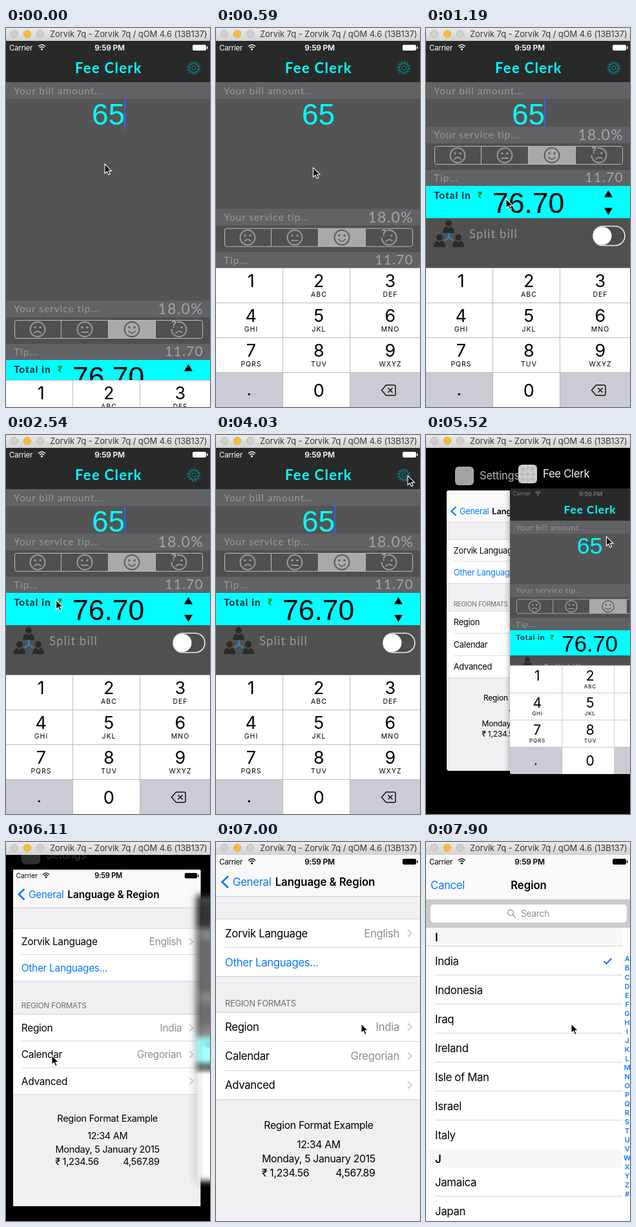
Animation, 316 px wide and 588 px high, one loop 8000 ms. Source, as an HTML page:

```html
<!DOCTYPE html>
<html lang="en">
<head>
<meta charset="utf-8">
<title>Tip calculator demo</title>
<style>
html, body { margin: 0; width: 100%; height: 100%; overflow: hidden; background: #000; }
svg { display: block; width: 316px; height: 588px; }
text { white-space: pre; }
</style>
</head>
<body>
<svg id="stage" viewBox="0 0 316 588"></svg>
<script>
const LOOP = 8000, STEP = 149.05;
const BLUE = '#0a7aff', GREY = '#8e8e93', APP = 'Fee Clerk', PHONE = 'Zorvik';

const FONTS = {
  ui: ['Inter, sans-serif', -0.02],
  hand: ['Lato, sans-serif', 0.06],
  num: ['Liberation Sans, Arial, sans-serif', 0]
};

// Text is centred vertically on y by its cap height.
function text(x, y, str, size, fill, { font = 'ui', at = 'start', weight = 400, gap } = {}) {
  const [family, track] = FONTS[font];
  return `<text x="${x}" y="${y + size * 0.363}" font-family="${family}" font-size="${size}" ` +
    `font-weight="${weight}" fill="${fill}" text-anchor="${at}" ` +
    `letter-spacing="${gap ?? (track * size).toFixed(2)}">${str}</text>`;
}
const rect = (x, y, w, h, fill, more = '') =>
  `<rect x="${x}" y="${y}" width="${w}" height="${h}" fill="${fill}" ${more}/>`;
const line = (d, stroke, width = 1, more = '') =>
  `<path d="${d}" fill="none" stroke="${stroke}" stroke-width="${width}" ${more}/>`;
const dot = (x, y, r, fill, more = '') => `<circle cx="${x}" cy="${y}" r="${r}" fill="${fill}" ${more}/>`;
const hand = (x, y, str, size, fill, more) => text(x, y, str, size, fill, { font: 'hand', ...more });
const mid = { at: 'middle' }, end = { at: 'end' };

function status(id, c) {
  return `<g id="${id}">` + text(5, 30.5, 'Carrier', 11.5, c) +
    line('M50 28.5Q55.5 23.5 61 28.5M52 30.8Q55.5 27.6 59 30.8', c, 1.5) +
    dot(55.5, 33, 1.5, c) +
    text(160.5, 30.5, '9:59 PM', 12, c, { at: 'middle', weight: 600 }) +
    rect(289.5, 26.5, 20, 8, c, `rx="1.5" stroke="${c}"`) + rect(311, 28.5, 1.5, 4, c) + '</g>';
}

function face(i, mouth, c) {
  const x = 49 + 73 * i;
  return dot(x, 197.5, 11.5, 'none', `stroke="${c}" stroke-width="2"`) +
    dot(x - 4, 194.5, 1.7, c) + dot(x + 4, 194.5, 1.7, c) +
    line(`M${x - 5} ${mouth}`, c, 1.8, 'stroke-linecap="round"');
}

const person = (x, y) => dot(x, y, 5, '#2b2b2b') +
  `<path d="M${x - 9} ${y + 15}q0-9 6-10l3 3 3-3q6 1 6 10z" fill="#2b2b2b"/>`;

function keyboard() {
  const letters = ['', 'ABC', 'DEF', 'GHI', 'JKL', 'MNO', 'PQRS', 'TUV', 'WXYZ'];
  const centers = [54, 159, 269.5];
  let s = rect(0, 372, 316, 216, '#fff') + rect(0, 534.5, 103.5, 54, '#c9ccd3') + rect(207.5, 534.5, 109, 54, '#c9ccd3');
  letters.forEach((word, i) => {
    const x = centers[i % 3], y = 372 + 54 * Math.floor(i / 3);
    s += text(x, y + 20, i + 1, 27, '#000', mid) + text(x + 0.5, y + 41.5, word, 10.5, '#000', { at: 'middle', gap: 1 });
  });
  return s + text(159, 562, '0', 27, '#000', mid) + text(51, 561, '.', 26, '#000', mid) +
    line('M103.5 372V588M207.5 372V588M0 372.5H316M0 426.5H316M0 480.5H316M0 534.5H316', '#b9bcc2') +
    line('M256.5 562l7-8H276q2 0 2 2v12q0 2-2 2h-12.5zM266.5 558.5l7 7m0-7l-7 7', '#111', 1.5);
}

function tipApp() {
  const label = '#93999c', band = '#616266';
  const panel =
    rect(0, 153, 316, 400, '#505050') +
    rect(0, 153, 316, 26, band) + hand(12, 165.5, 'Your service tip...', 15.5, label) +
    hand(306, 166, '18.0%', 23, '#a4a4a4', end) +
    rect(158, 183.5, 73, 28, '#a9a9a9') +
    rect(13.5, 183.5, 291, 28, 'none', 'rx="3" stroke="#bbb"') +
    line('M85.5 184v27M158.5 184v27M231.5 184v27', '#bbb') +
    face(0, '203.5q5-6 10 0', '#999') + face(1, '202h10', '#999') +
    face(2, '200.5q5 6 10 0', '#5c5c5c') + face(3, '203.5q5-5 10-1', '#999') +
    rect(255, 184, 10, 13, '#505050') +
    text(260, 190, '?', 14, '#aaa', { at: 'middle', weight: 700 }) +
    rect(0, 220, 316, 25, band) + hand(12, 232.5, 'Tip...', 15.5, label) +
    hand(306, 231.5, '11.70', 21, '#a4a4a4', end) +
    rect(0, 245, 316, 50, '#0ff') + hand(12, 259, 'Total in', 15.5, '#123', { weight: 700 }) +
    text(80, 259, '₹', 13, '#080', { weight: 600 }) +
    text(103, 271, '76.70', 44.5, '#000', { font: 'num' }) +
    '<path d="M276 262.5h13l-6.5-11zM276 279h13l-6.5 11z"/>' +
    person(35, 303) + person(21, 325) + person(50, 325) +
    line('M35.5 318v7l-7 5m7-5l7 5', '#1a8fe0', 2) +
    hand(67, 319, 'Split bill', 18.5, '#999') +
    rect(259, 307.5, 49, 30, '#4c4c4c', 'rx="15" stroke="#eee" stroke-width="1.6"') + dot(273.5, 322.5, 14, '#fff');
  return rect(0, 20, 316, 568, '#545454') + rect(0, 20, 316, 64, '#282929') +
    status('appStatus', '#fff') +
    hand(159, 62, APP, 22, '#0ff', { at: 'middle', weight: 700 }) +
    dot(291, 62, 9, 'none', 'stroke="#17666b" stroke-width="3" stroke-dasharray="2.8 1.9"') +
    dot(291, 62, 7, 'none', 'stroke="#17666b" stroke-width="2"') +
    dot(291, 62, 3, 'none', 'stroke="#17666b" stroke-width="1.6"') +
    rect(0, 84, 316, 26, band) + hand(12, 97.5, 'Your bill amount...', 15.5, label) +
    text(158.5, 133, '65', 46, '#0ff', { font: 'num', at: 'middle' }) +
    rect(183, 107, 2, 51.5, '#3d5fe8', 'id="caret"') +
    `<g id="panel">${panel}</g><g id="keys">${keyboard()}</g>`;
}

function settings() {
  const row = (y, name, value, c = '#000') => text(14, y, name, 16.8, c) +
    (value === undefined ? '' : text(284, y, value, 16.8, GREY, end) +
      line(`M297 ${y - 5.5}l6 5.5-6 5.5`, '#c7c7cc', 1.8));
  return rect(0, 20, 316, 568, '#efeff4') + rect(0, 20, 316, 64, '#f9f9f9') +
    status('setStatus', '#000') +
    line('M19 53l-9.5 9 9.5 9', BLUE, 2.8) + text(26, 62, 'General', 16.8, BLUE) +
    text(169, 62, 'Language &amp; Region', 16.8, '#000', { at: 'middle', weight: 600, gap: -0.07 }) +
    rect(0, 119.5, 316, 89, '#fff') + rect(0, 264.5, 316, 135, '#fff') +
    line('M0 84.5H316M0 119.5H316M0 208.5H316M0 264.5H316M0 399.5H316M14 163.5H316M14 309.5H316M14 354.5H316', '#c8c7cc', 0.8) +
    row(141.5, PHONE + ' Language', 'English') + row(186.5, 'Other Languages...', undefined, BLUE) +
    text(14, 250, 'REGION FORMATS', 12.8, '#6d6d72') +
    row(287, 'Region', 'India') + row(332, 'Calendar', 'Gregorian') + row(377, 'Advanced', '') +
    [['Region Format Example', 439.5], ['12:34 AM', 469.5], ['Monday, 5 January 2015', 491.5]]
      .map(([s, y]) => text(159, y, s, 15.8, '#000', mid)).join('') +
    text(71, 513, '₹ 1,234.56', 15.8, '#000') + text(246.5, 513, '4,567.89', 15.8, '#000', end);
}

function regions() {
  const bold = { weight: 600 };
  let s = rect(0, 20, 316, 568, '#fff') + rect(0, 20, 316, 69, '#fafafa') +
    text(7, 67, 'Cancel', 16.8, BLUE) +
    text(159, 67, 'Region', 16.8, '#000', { at: 'middle', weight: 600, gap: -0.07 }) +
    rect(0, 89, 316, 44, '#c9c9ce') + rect(7, 97, 304, 28, '#fff', 'rx="5"') +
    dot(131, 109.5, 4.3, 'none', `stroke="${GREY}" stroke-width="1.2"`) +
    line('M134 112.5l5 5', GREY, 1.3) + text(147, 111, 'Search', 13.8, GREY);
  ['I', 'J'].forEach((c, i) => {
    s += rect(0, 133 + 344 * i, 304, 28, '#f7f7f7') + text(14, 147.5 + 344 * i, c, 16.8, '#000', bold);
  });
  ['India', 'Indonesia', 'Iraq', 'Ireland', 'Isle of Man', 'Israel', 'Italy', 'Jamaica', 'Japan'].forEach((name, i) => {
    const y = 184.5 + 45 * i + (i > 6 ? 28 : 0);
    s += text(14, y, name, 16.8, '#000');
    if (i !== 6) s += line(`M14 ${y + 22}H304`, '#d0d0d4', 0.9);
  });
  s += line('M0 161.5H304', '#d0d0d4', 0.9) + line('M275.5 185l4 4 8-8.5', BLUE, 2);
  [...'ABCDEFGHIJKLMNOPQRSTUVWXYZ#'].forEach((c, i) => {
    s += text(311.5, 181.5 + 14.04 * i, c, 10.8, BLUE, { at: 'middle', weight: 600 });
  });
  return s;
}

const card = (id, body) =>
  `<g id="${id}"><g clip-path="url(#round)">${body}</g></g>`;
const label = (id, name, fill, ink, marks = '') =>
  `<g id="${id}">${rect(13, -37, 29, 29, fill, 'rx="6"')}${marks}${text(51, -23, name, 16.8, ink)}</g>`;
const grid = line('M20-37v29M27.5-37v29M35-37v29M13-30h29M13-22.5h29M13-15h29M13-37l29 29M42-37l-29 29', '#aaa', 0.6) +
  dot(27.5, -22.5, 10, 'none', 'stroke="#aaa" stroke-width=".6"');

const $ = id => document.getElementById(id);
$('stage').innerHTML =
  '<clipPath id="round"><rect id="corner" y="20" width="316" height="568"/></clipPath>' +
  rect(0, 0, 316, 588, '#000') +
  card('set', settings()) + label('setLabel', 'Settings', '#a4a4a6', '#b4b4b4') +
  card('app', tipApp()) + label('appLabel', APP, '#dcdcdc', '#fff', grid) +
  `<g id="modal">${regions()}</g><g id="modalBar">${status('modalStatus', '#000')}</g>` +
  '<linearGradient id="bar" x2="0" y2="1"><stop stop-color="#ebebeb"/><stop offset="1" stop-color="#d2d2d2"/></linearGradient>' +
  rect(0, 0, 316, 20, 'url(#bar)') +
  [['#cfcfcf', 13], ['#fdbc2e', 33], ['#cfcfcf', 53]].map(([c, x]) =>
    dot(x, 9, 5.8, c, 'stroke="#000" stroke-opacity=".12"')).join('') +
  text(68, 9.5, `${PHONE} 7q - ${PHONE} 7q / qOM 4.6 (13B137)`, 13, '#3a3a3a', { gap: -0.1 }) +
  '<path id="cursor" d="M0 0V14.5L3.4 11.5 5.7 16.8 8.2 15.7 5.9 10.6H10.5Z" stroke="#fff" stroke-width="1.1"/>';

// Pointer stops: time, x, y.
const PATH = [
  [0, 153, 211], [500, 152, 214], [1192, 124, 265], [1800, 90, 262], [2300, 72, 260],
  [2840, 86, 250], [3430, 303, 68], [3720, 297, 63], [5215, 297, 63], [5510, 280, 157],
  [5660, 71, 331], [6250, 71, 331], [6900, 225, 282], [LOOP, 225, 282]
];
const clamp = v => Math.min(1, Math.max(0, v));
const lerp = (a, b, u) => a + (b - a) * u;
const easeOut = u => 1 - (1 - clamp(u)) ** 3;
const smooth = u => (u = clamp(u)) * u * (3 - 2 * u);
const move = (id, x, y, s = 1) => $(id).setAttribute('transform', `translate(${x} ${y}) scale(${s})`);
const fade = (id, v) => $(id).setAttribute('opacity', clamp(v));

function place(id, x, y, s) {
  move(id, x, y - 20 * s, s);
  move(id + 'Label', x, y);
}

function draw(t) {
  const back = easeOut((t - 4400) / 720);   // into the app switcher
  const open = easeOut((t - 5880) / 770);   // settings card grows
  const list = easeOut((t - 7400) / 450);   // region list slides up

  move('panel', 0, 270 * (1 - smooth(t / 1150)) + 57 * back);
  move('keys', 0, 174 * (1 - easeOut(t / 450)));
  fade('caret', t < 4400 && (t + 50) % 1000 < 600 ? 1 : 0);

  place('app', 130 * back + 252 * open, lerp(20, 83, back), lerp(1, 0.78, back));
  $('app').style.filter = back > 0
    ? `blur(${9 * open}px) grayscale(${open}) brightness(${1 + 0.4 * open}) drop-shadow(0 0 6px #0006)`
    : 'none';
  fade('app', open < 1 ? 1 : 0);
  fade('appStatus', 1 - 0.65 * back);
  fade('appLabel', 0.95 * back * (1 - 1.5 * open));

  place('set', lerp(lerp(-210, 32, back), 0, open), lerp(86, 20, open), lerp(0.766, 1, open));
  fade('set', back > 0 ? 1 : 0);
  fade('setStatus', open * 1.5);
  fade('setLabel', clamp((t - 4600) / 620) * (1 - 1.1 * open));
  $('corner').setAttribute('rx', 5 * back * (1 - open));

  move('modal', 0, 568 * (1 - list));
  fade('modal', list > 0 ? 1 : 0);
  fade('modalBar', list > 0 ? 1 : 0);

  const i = PATH.findIndex(p => p[0] > t);
  const [a, b] = [PATH[i - 1], PATH[i]], u = smooth((t - a[0]) / (b[0] - a[0]));
  move('cursor', lerp(a[1], b[1], u), lerp(a[2], b[2], u));
}

// The picture advances in steps of about 149 ms.
function tick() {
  draw(Math.floor((performance.now() % LOOP + 10) / STEP) * STEP);
  requestAnimationFrame(tick);
}
tick();
</script>
</body>
</html>
```
